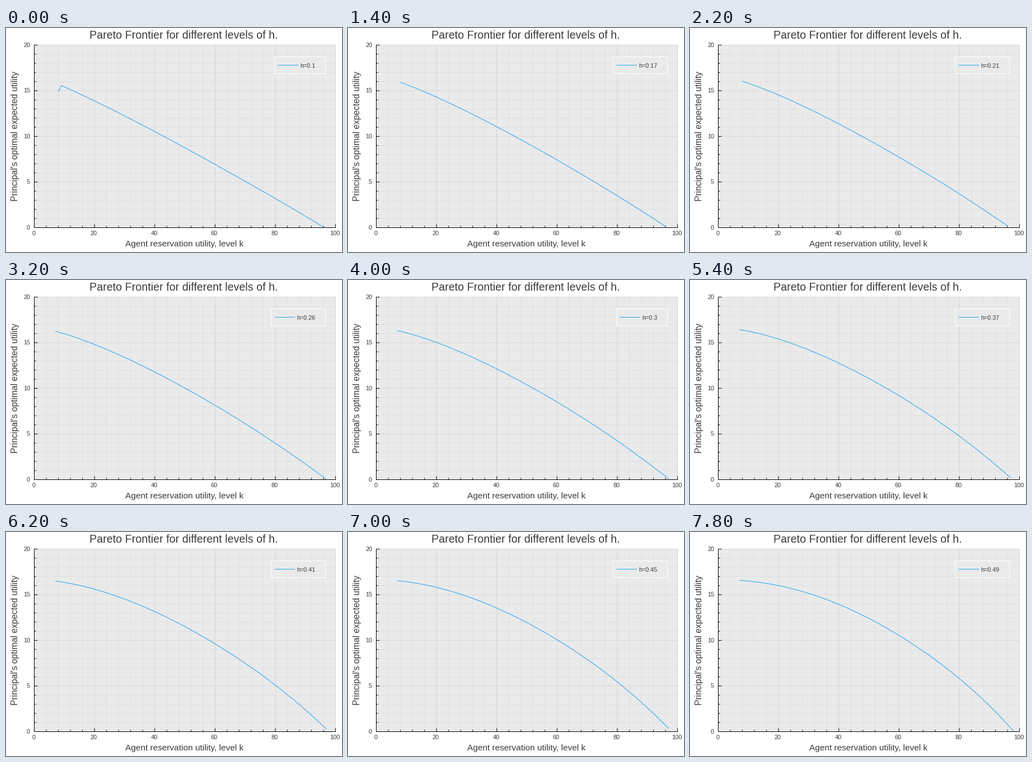
Animation of 600 by 400 pixels, one loop 8 s. Source, as a matplotlib script:

```python
import numpy as np
import matplotlib.pyplot as plt
from matplotlib.animation import FuncAnimation
from matplotlib.patches import Rectangle

W, H, DPI = 600, 400, 100
LEFT, RIGHT, TOP, BOTTOM = 50.5, 588.5, 30.5, 356.5
BLUE, INK, PANEL = "#1ca3f8", "#3a3a3a", "#eaeaea"
FRAMES, STEP_MS = 40, 200

plt.rcParams["font.family"] = "Liberation Sans"
plt.rcParams["path.snap"] = False


def smooth(*vals):
    """Polynomial through values at a few reservation levels."""
    levels = np.array([8, 20, 40, 60, 80, 98]) / 100
    return np.poly1d(np.polyfit(levels, vals, 5))


# The frontier bends from LOW (h = 0.1) to HIGH (h = 0.49).
LOW = smooth(15.71, 13.88, 10.52, 6.93, 3.19, -0.35)
HIGH = smooth(16.55, 16.00, 13.94, 10.54, 5.82, 0.05)
BEND = smooth(0.45, 0.26, -0.58, -1.10, -1.15, -0.10)


def px(k):
    return LEFT + (RIGHT - LEFT) * k / 100


def py(v):
    return BOTTOM - (BOTTOM - TOP) * v / 20


def frontier(step):
    t = step / (FRAMES - 1)
    k = np.arange(8 if step < 14 else 7, 99)
    x = k / 100
    v = LOW(x) * (1 - t) + HIGH(x) * t + BEND(x) * t * (1 - t)
    v[0] -= 0.81 * 0.4**step
    feasible = v >= 0
    return px(k[feasible]), py(v[feasible])


fig = plt.figure(figsize=(W / DPI, H / DPI), dpi=DPI, facecolor="white")
ax = fig.add_axes([0, 0, 1, 1])
ax.set(xlim=(0, W), ylim=(H, 0))
ax.axis("off")


def line(x, y, color, z=2):
    return ax.plot(x, y, color=color, lw=72 / DPI, zorder=z,
                   solid_capstyle="butt")[0]


def text(x, y, s, size, ha="center", **kw):
    return ax.text(x, y, s, size=size * 72 / DPI, color=INK, ha=ha,
                   va="baseline", zorder=6, **kw)


def grid_style(i):
    major = i % 5 == 0
    return major, "#d6d6d6" if major else "#e0e0e0", 6 if major else 3


ax.add_patch(Rectangle((LEFT, TOP), RIGHT - LEFT, BOTTOM - TOP,
                       fc=PANEL, ec="none", zorder=0))

for i in range(26):
    major, shade, tick = grid_style(i)
    x = px(4 * i)
    line([x, x], [TOP, BOTTOM], shade, z=1 + major)
    line([x, x], [BOTTOM, BOTTOM - tick], "black", z=3)
    if major:
        text(x - 1.3, 370, str(4 * i), 11)

for i in range(21):
    major, shade, tick = grid_style(i)
    y = py(i)
    line([LEFT, RIGHT], [y, y], shade, z=1 + major)
    line([LEFT, LEFT + tick], [y, y], "black", z=3)
    if major:
        text(43.2, y + 3.2, str(i), 11, ha="right")

line([LEFT, LEFT], [TOP, BOTTOM + 0.5], "black", z=3)
line([LEFT - 0.5, RIGHT], [BOTTOM, BOTTOM], "black", z=3)

text(317.3, 19, "Pareto Frontier for different levels of h.", 19.6)
text(318.5, 390, "Agent reservation utility, level k", 15.4)
text(21, 193, "Principal's optimal expected utility", 15.5,
     rotation=90, rotation_mode="anchor")

curve = line([], [], BLUE, z=4)
box = ax.add_patch(Rectangle((479.5, 51.5), 91, 30, fc=PANEL, ec="white",
                             lw=72 / DPI, zorder=5))
key = line([], [], BLUE, z=6)
label = text(526, 71, "", 10.8, ha="left")


def update(step):
    curve.set_data(*frontier(step))
    name = f"h={round(0.1 + step / 100, 2)}"
    x = 479.5 if len(name) == 5 else 473.5
    box.set_x(x)
    box.set_width(570.5 - x)
    key.set_data([x + 6, x + 42.5], [66.5, 66.5])
    label.set_position((x + 45.7, 71))
    label.set_text(name)
    return curve, box, key, label


anim = FuncAnimation(fig, update, frames=FRAMES, interval=STEP_MS,
                     repeat=True, repeat_delay=0, blit=False)
plt.show()
```
